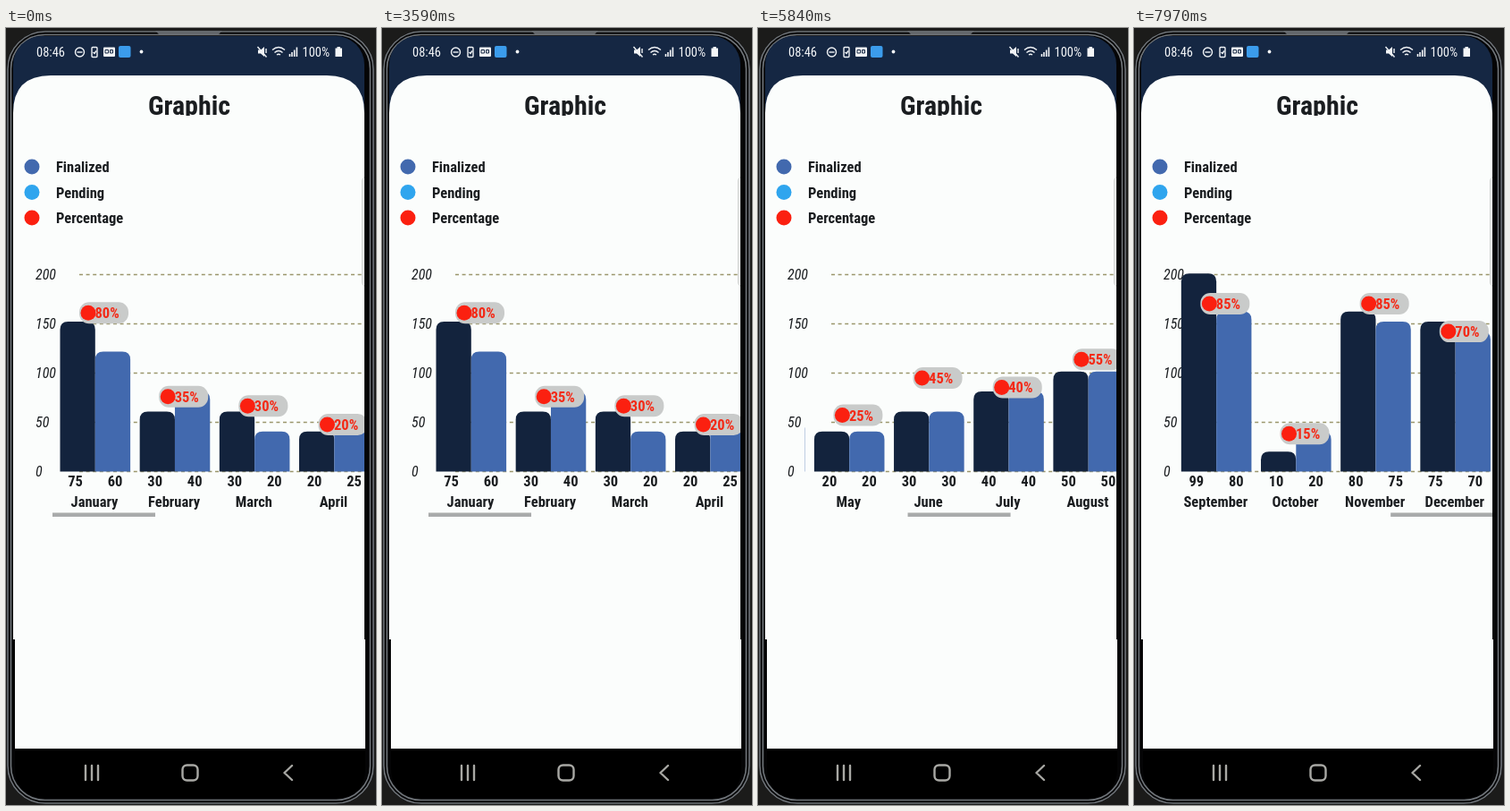
Recreate the animation shown at these times as an HTML page. Size 414 px wide and 868 px high, loop 8 s.

```html
<!DOCTYPE html>
<html lang="en">
<head>
<meta charset="utf-8">
<title>Graphic</title>
<style>
html, body { margin: 0; width: 100%; height: 100%; overflow: hidden; background: #1b1b1a; }
svg { display: block; width: 414px; height: 868px; }
text { font: 700 16.5px "Roboto Condensed", Roboto, sans-serif; font-stretch: 75%; fill: #1a1d20; }
.mid { text-anchor: middle; }
.title { font-size: 30px; }
.axis { font-weight: 400; font-style: italic; font-size: 16px; }
.pct { fill: #f32a17; }
.status { font-weight: 400; font-size: 14.5px; font-stretch: 100%; fill: #f4f6f8; }
.line { fill: none; stroke: #f0f3f6; stroke-width: 1.4; }
.nav { fill: none; stroke: #a8a8a4; stroke-width: 2.4; stroke-linecap: round; stroke-linejoin: round; }
.rim { fill: none; stroke: #70757a; stroke-width: 1.6; }
.grid { stroke: #9b966c; stroke-width: 1.5; stroke-dasharray: 4 3.6; }
</style>
</head>
<body>
<svg viewBox="0 0 414 868">
  <defs>
    <clipPath id="view"><rect x="52" y="260" width="349" height="290"/></clipPath>
    <clipPath id="titleBox"><rect x="100" y="60" width="210" height="38"/></clipPath>
    <clipPath id="panel"><rect x="8" y="53" width="393" height="630"/></clipPath>
  </defs>

  <!-- phone -->
  <rect x="1" y="3" width="411" height="864" rx="43" fill="#050506"/>
  <rect class="rim" x="2" y="4" width="409" height="862" rx="42"/>
  <rect class="rim" x="5.5" y="7.5" width="402" height="855" rx="38"/>
  <path d="M167 3H242L238 7H171Z" fill="#64686c"/>
  <rect x="8" y="9" width="393" height="130" rx="32" fill="#152743"/>
  <path d="M8 95Q8 53 50 53H359Q401 53 401 95V683H402V805H10V683H8Z" fill="#fbfdfc"/>
  <path d="M10 805H402V826Q402 860 368 860H44Q10 860 10 826Z" fill="#000"/>

  <!-- status bar -->
  <text class="status" x="34" y="32">08:46</text>
  <g class="line">
    <circle cx="82.5" cy="27" r="5"/><path d="M79.5 27h6"/>
    <rect x="96" y="21.5" width="6" height="11" rx="1"/><path d="M97.5 27l1.5 1.5 2-3"/>
  </g>
  <rect x="109" y="21.5" width="13" height="10.5" rx="1" fill="#f4f6f8"/>
  <path d="M111 28h3.5v-3.5H111zM116.5 28h3v-3.5h-3z" fill="none" stroke="#152743"/>
  <rect x="126" y="20" width="13.5" height="13" rx="2" fill="#3b9cec"/>
  <circle cx="151.5" cy="26.5" r="1.9" fill="#f4f6f8"/>
  <path d="M282 24.5h3l4-3.5v11l-4-3.5h-3z" fill="#f4f6f8"/>
  <path class="line" d="M281.5 21l10 11.5M291 23v5"/>
  <path class="line" d="M298 24.5q7-6 14 0M300.5 27.5q4.5-4 9 0M303 30q2-1.5 4 0"/>
  <path d="M317.5 32v-3M320 32v-5M322.7 32v-7.5M325.4 32v-10.5" stroke="#f4f6f8" stroke-width="1.6"/>
  <text class="status" x="331.5" y="32">100%</text>
  <path d="M368.5 22.5h2v-1.5h3.5v1.5h2v9.5h-7.5z" fill="#f4f6f8"/>

  <!-- page -->
  <g clip-path="url(#titleBox)"><text class="title mid" x="205" y="96.5">Graphic</text></g>
  <rect x="398.5" y="166" width="60" height="123" rx="5" fill="none" stroke="#d0d2d0" clip-path="url(#panel)"/>
  <g id="legend"></g>
  <g id="axis"></g>
  <g clip-path="url(#view)">
    <g id="chart"></g>
    <rect id="thumb" x="52" y="541.5" width="115" height="4.5" fill="#a9abab"/>
  </g>

  <!-- navigation -->
  <path class="nav" d="M89 824v16M96 824v16M103 824v16M320 824l-8.5 8 8.5 8"/>
  <rect class="nav" x="197.5" y="823.5" width="17" height="17" rx="5"/>

  <g id="hand" fill="#fcfdfc" stroke="#08090a" stroke-width="3" stroke-linejoin="round" stroke-linecap="round">
    <path d="M241 524Q240 512 234 505L223 483Q220 474 226 472Q231 471 234 476L238 483V447
      Q238 441 243.5 441Q249 441 249 447V468Q250 464 255 464Q261 465 261 471Q262 468 267 468
      Q273 469 273 475Q274 472 279 473Q284 474 284 481Q285 494 278 507Q273 514 272 524Z"/>
    <path d="M249 467V481M261 471V482M273 475V484" fill="none" stroke-width="2.5"/>
  </g>
</svg>
<script>
const LOOP = 8000, BASE = 495.5, STEP = 1070 / 12, VIEW = 349;
const DARK = '#13233d', BLUE = '#4269ae', RED = '#fb2010';
const $ = id => document.getElementById(id);

// first bar, second bar, percentage
const months = {
  January: [75, 60, 80], February: [30, 40, 35], March: [30, 20, 30],
  April: [20, 25, 20], May: [20, 20, 25], June: [30, 30, 45],
  July: [40, 40, 40], August: [50, 50, 55], September: [99, 80, 85],
  October: [10, 20, 15], November: [80, 75, 85], December: [75, 70, 70]
};
// start time and distance of each flick
const flicks = [[4130, 275], [5740, 264], [7020, 182]], FLICK = 900;

const text = (x, y, s, cls = '') => `<text x="${x}" y="${y}" class="${cls}">${s}</text>`;
const dot = (x, y, fill) => `<circle cx="${x}" cy="${y}" r="8.5" fill="${fill}"/>`;

function bar(x, value, fill) {
  const top = BASE - value * 2.235;
  return `<path d="M${x} ${BASE}V${top + 9}q0 -9 9 -9h21.3q9 0 9 9V${BASE}z" fill="${fill}"/>`;
}

function month([name, [a, b, pct]], i) {
  const x = 60.5 + i * STEP, y = 484.5 - pct * 2.077;
  return bar(x, a, DARK) + bar(x + 39.3, b, BLUE) +
    text(x + 17, 512, a, 'mid') + text(x + 61.5, 512, b, 'mid') + text(x + 38.5, 535, name, 'mid') +
    `<rect x="${x + 21.5}" y="${y - 12}" width="55" height="24" rx="11" fill="#c9cbca"/>` +
    dot(x + 31.5, y, RED) + text(x + 39, y + 6, pct + '%', 'pct');
}

$('legend').innerHTML = [['Finalized', BLUE], ['Pending', '#2fa5ee'], ['Percentage', RED]]
  .map(([s, fill], i) => dot(29, 155 + i * 28.5, fill) + text(56, 161 + i * 28.5, s)).join('');
$('axis').innerHTML = [200, 150, 100, 50, 0].map((v, i) => {
  const y = 276 + i * 55;
  return text(33, y + 5, v, 'axis') + `<path class="grid" d="M82 ${y - .5}H401"/>`;
}).join('');
$('chart').innerHTML = Object.entries(months).map(month).join('');

const ramp = (t, from, to) => Math.max(0, Math.min(1, (t - from) / (to - from)));
const easeOut = u => 1 - (1 - u) ** 3;

function draw(now) {
  const t = now % LOOP;
  const s = flicks.reduce((sum, [at, d]) => sum + d * easeOut(ramp(t, at, at + FLICK)), 0);
  $('chart').setAttribute('transform', `translate(${-s})`);
  $('thumb').setAttribute('x', 52 + s * VIEW / 1070);

  // The hand rises from below the stage, rests and drops out again
  const drop = 1 - easeOut(ramp(t, 40, 830)) + ramp(t, 1750, 2560) ** 3;
  $('hand').setAttribute('transform', `translate(0 ${drop * 432})`);
  requestAnimationFrame(draw);
}
draw(0);
</script>
</body>
</html>
```
